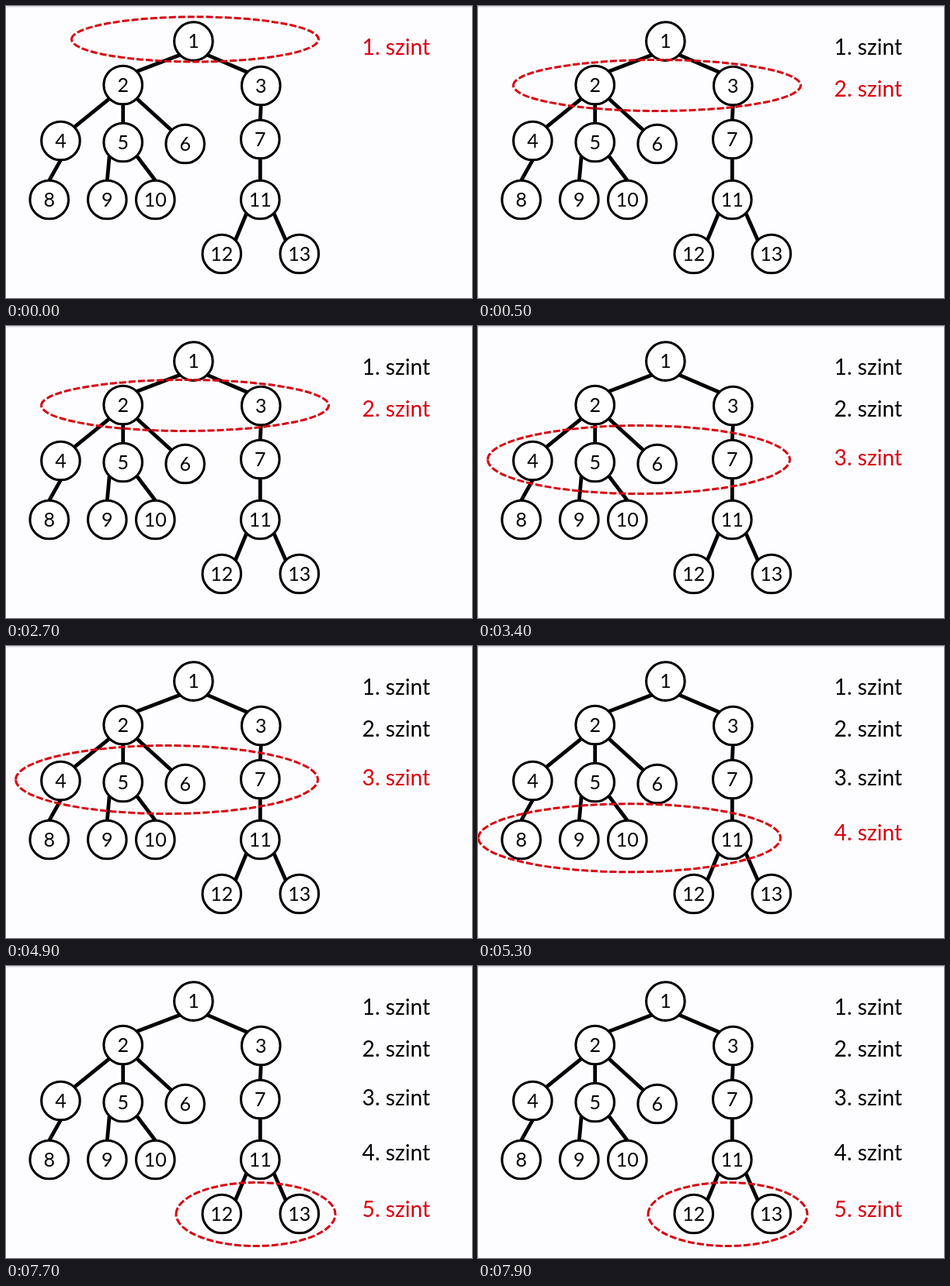
An HTML page for the animation above (8000 ms loop, 600 px wide and 377 px high).

```html
<!DOCTYPE html>
<html lang="hu">
<head>
<meta charset="utf-8">
<style>
html, body { margin: 0; width: 100%; height: 100%; overflow: hidden; background: #fdfcfe; }
svg { display: block; width: 600px; height: 377px; font-family: Lato, Calibri, sans-serif; }
#edges { stroke: #000; stroke-width: 4.8; }
#nodes circle { fill: #fff; stroke: #000; stroke-width: 3.1; }
#nodes text { font-size: 25px; text-anchor: middle; }
#rings path { fill: none; stroke: #d8000f; stroke-width: 3; stroke-dasharray: 9 3; }
#labels text { font-size: 28.2px; }
</style>
</head>
<body>
<svg viewBox="0 0 600 377">
  <rect width="600" height="1.6" fill="#dcdcde"/>
  <g id="edges"></g>
  <g id="nodes"></g>
  <g id="rings"></g>
  <g id="labels"></g>
</svg>
<script>
const LOOP = 8000, R = 24.8, RED = '#d8000f';

// x, y and the parent's number
const nodes = [
  [241.4, 45.6], [150.7, 102, 1], [328.3, 103, 1],
  [70.4, 174, 2], [150.7, 176, 2], [230.7, 178, 2], [327.3, 172, 3],
  [55.7, 250, 4], [130.3, 250, 5], [192.3, 250, 5], [327.3, 250, 7],
  [277.8, 320, 11], [377.8, 320, 11]
];
// start time, ring centre and radii, label baseline
const levels = [
  { at: 0, ring: [243.5, 43, 159, 29], base: 63 },
  { at: 100, ring: [230.5, 102.5, 185, 33], base: 117 },
  { at: 2800, ring: [207, 172.5, 194.5, 44], base: 180 },
  { at: 5300, ring: [195, 247.8, 194.5, 44], base: 251 },
  { at: 7100, ring: [321.5, 320.5, 102.5, 41], base: 324 }
];

function add(parent, tag, attrs, text = '') {
  const el = document.createElementNS('http://www.w3.org/2000/svg', tag);
  for (const key in attrs) el.setAttribute(key, attrs[key]);
  el.textContent = text;
  document.getElementById(parent).append(el);
  return el;
}

// Edges meet a circle at its top or bottom, or 45° aside when the step is wide.
function anchor([x, y], dx, limit, down) {
  const angle = Math.abs(dx) > limit ? Math.sign(dx) * Math.PI / 4 : 0;
  return [x + R * Math.sin(angle), y + down * R * Math.cos(angle)];
}

nodes.forEach((node, i) => {
  const [x, y, parent] = node;
  if (parent) {
    const from = nodes[parent - 1], dx = x - from[0];
    const [x1, y1] = anchor(from, dx, R * .7, 1);
    const [x2, y2] = anchor(node, -dx, R * 1.8, -1);
    add('edges', 'line', { x1, y1, x2, y2 });
  }
  add('nodes', 'circle', { cx: x, cy: y, r: R });
  add('nodes', 'text', { x, y: y + 8.6 }, i + 1);
});

levels.forEach((level, i) => {
  const [cx, cy, rx, ry] = level.ring;
  const half = `a${rx} ${ry} 0 0 1 `;
  level.ringEl = add('rings', 'path', { d: `M${cx - rx} ${cy}${half}${2 * rx} 0${half}${-2 * rx} 0` });
  level.labelEl = add('labels', 'text', { x: 458.6, y: level.base }, `${i + 1}. szint`);
});

const start = performance.now();
function draw(now) {
  const t = Math.max(0, now - start) % LOOP;
  const current = levels.findLastIndex(level => t >= level.at);
  levels.forEach(({ ringEl, labelEl }, i) => {
    ringEl.style.display = i === current ? '' : 'none';
    labelEl.style.display = i <= current ? '' : 'none';
    labelEl.style.fill = i === current ? RED : '#000';
  });
  requestAnimationFrame(draw);
}
draw(start);
</script>
</body>
</html>
```
